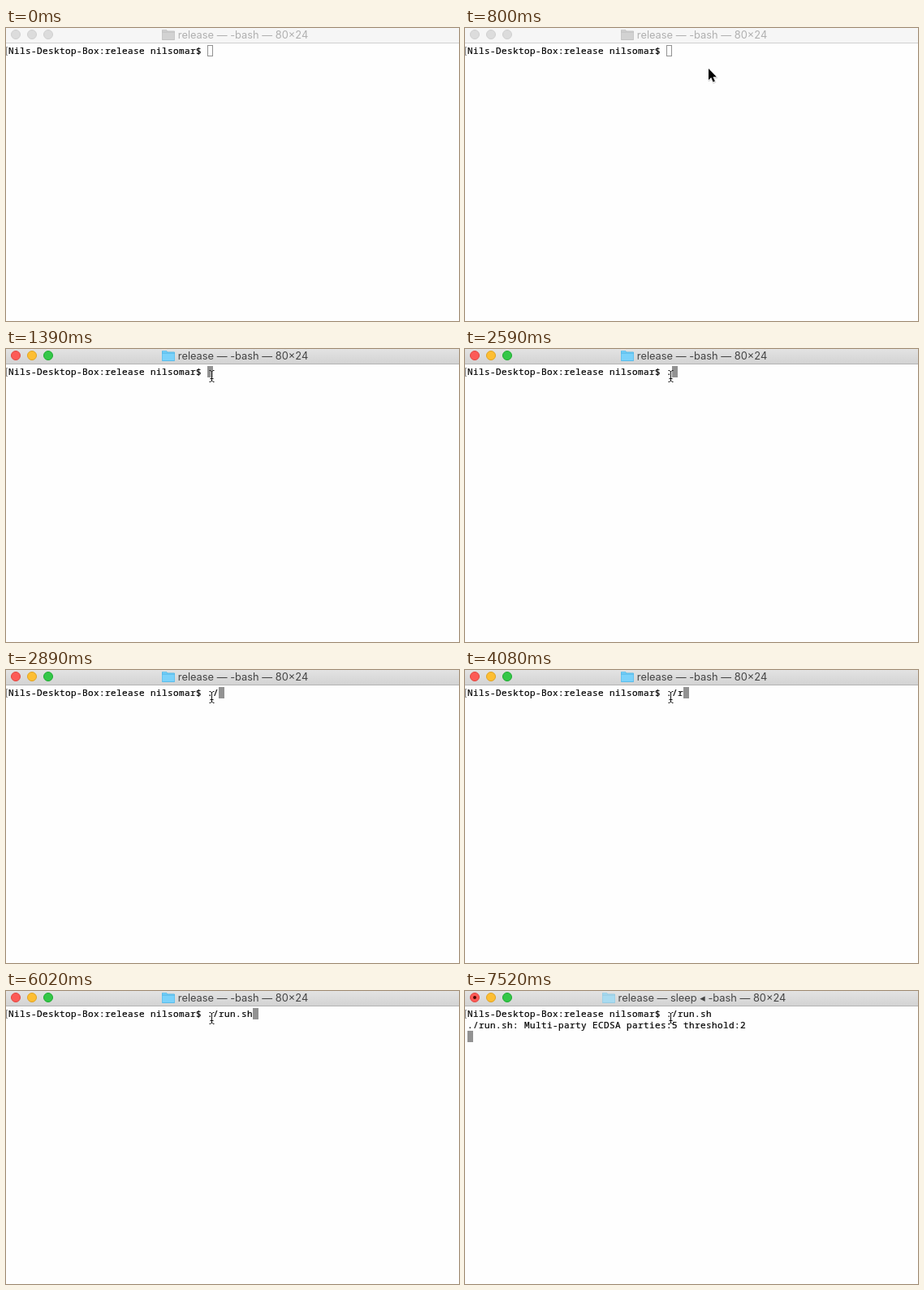
An HTML page for the animation above (8000 ms loop, 558 by 361 pixels).

```html
<!DOCTYPE html>
<html lang="en">
<head>
<meta charset="utf-8">
<title>Terminal</title>
<style>
html, body { margin: 0; width: 100%; height: 100%; overflow: hidden; background: #fefefe; }
svg, #text { position: absolute; left: 0; top: 0; }
#title { font: 12.85px Inter, "Liberation Sans", sans-serif; text-anchor: middle; fill: #444; }
#text {
  left: 3px; top: 21px; margin: 0; color: #000; white-space: pre;
  font: 500 11px/14px "Noto Sans Mono", "DejaVu Sans Mono", monospace;
  letter-spacing: calc(7px - 1ch);
  -webkit-text-stroke: .2px #000;
}
.light { stroke-width: 1; }
#caret { fill: #929292; }
#front { fill: #7bd2fa; }
#back { fill: #4fb5e4; }
.busy #front { fill: #a9dbf0; }
.busy #back { fill: #93c9e0; }
.idle #bar { fill: #f6f6f6; }
.idle #edge { fill: #d0d0d0; }
.idle .light { fill: #dcdcdc; stroke: #d0d0d0; }
.idle #title { fill: #b0b0b0; }
.idle #front { fill: #d2d2d2; }
.idle #back { fill: #bfbfbf; }
.idle #caret { fill: none; stroke: #929292; }
</style>
</head>
<body>
<div id="win" class="idle">
  <svg width="558" height="361">
    <defs>
      <linearGradient id="chrome" x2="0" y2="1">
        <stop offset="0" stop-color="#e3e3e3"/>
        <stop offset="1" stop-color="#d3d3d3"/>
      </linearGradient>
      <path id="pointer" d="M1 0v14l3.200-3 2.400 5.600 2.300-1-2.400-5.400h4.400z"/>
    </defs>
    <rect id="bar" width="558" height="18" fill="url(#chrome)"/>
    <rect id="edge" y="18" width="558" height="1" fill="#b4b4b4"/>
    <circle class="light" cx="12" cy="8" r="5.5" fill="#fc5b57" stroke="#e2463f"/>
    <circle class="light" cx="32" cy="8" r="5.5" fill="#fdbe33" stroke="#e0a322"/>
    <circle class="light" cx="52" cy="8" r="5.5" fill="#34c748" stroke="#1dab30"/>
    <circle id="dot" cx="12" cy="8" r="2" fill="#4d0503"/>
    <g id="folder">
      <path id="back" d="M0 3q0-1 1-1h4.500l1.500 1.500h8q1 0 1 1v9.500q0 1-1 1h-14q-1 0-1-1z"/>
      <path id="front" d="M.5 5.500h15v8q0 .7-.7.7h-13.600q-.7 0-.7-.7zM.7 3q0-.5.5-.5h4l1.500 1.500h8q.6 0 .6.600h-14.600z"/>
    </g>
    <text id="title" x="292" y="13"></text>
    <path d="M2 23.500H.5v10H2" fill="none" stroke="#888"/>
    <rect id="caret"/>
  </svg>
  <div id="text"></div>
  <svg width="558" height="361">
    <g id="arrow" stroke-linejoin="round">
      <use href="#pointer" x=".4" y="1" stroke="#000" stroke-width="2" opacity=".15"/>
      <use href="#pointer" stroke="#fff" stroke-width="1.600" paint-order="stroke"/>
    </g>
    <g id="beam" fill="none" stroke-linecap="square">
      <path d="M253.500 28v11" stroke="#fff" stroke-width="2.400" opacity=".7"/>
      <path d="M251 26.500h1l1.500 1.500 1.500-1.500h1M251 40.500h1l1.500-1.500 1.500 1.500h1M253.500 28v11M252 36.500h3" stroke="#111"/>
    </g>
  </svg>
</div>
<script>
const LOOP = 8000, FOCUS = 1390, RUN = 7520;
const prompt = "Nils-Desktop-Box:release nilsomar$ ";
const command = "./run.sh";
const output = "\n./run.sh: Multi-party ECDSA parties:5 threshold:2";
const keys = [2590, 2890, 4080, 4230, 4530, 5130, 5870, 6020];
// time, x, y of the pointer
const moves = [
  [500, 510, 77], [650, 388, 58], [800, 299, 50],
  [950, 264, 40], [1100, 252, 32], [1240, 251, 33]
];

const $ = id => document.getElementById(id);
const show = (id, on) => $(id).setAttribute("visibility", on ? "visible" : "hidden");
const place = (id, x, y) => $(id).setAttribute("transform", `translate(${x} ${y})`);
const setText = (id, s) => { if ($(id).textContent !== s) $(id).textContent = s; };

function setCaret(x, y, inset) {
  const box = { x: x + inset, y: y + inset, width: 7 - 2 * inset, height: 14 - 2 * inset };
  for (const k in box) $("caret").setAttribute(k, box[k]);
}

function draw(t) {
  const focused = t >= FOCUS, running = t >= RUN;
  const typed = keys.filter(k => k <= t).length;
  const pos = moves.filter(m => m[0] <= t).pop();

  $("win").className = running ? "busy" : focused ? "" : "idle";
  setText("title", running ? "release — sleep ◂ -bash — 80×24" : "release — -bash — 80×24");
  place("folder", running ? 169 : 192, 0);
  show("dot", running);

  setText("text", prompt + command.slice(0, typed) + (running ? output : ""));
  if (running) setCaret(3, 49, 0);
  else setCaret(3 + 7 * (prompt.length + typed), 21, focused ? 0 : 0.5);

  show("arrow", pos && !focused);
  if (pos) place("arrow", pos[1], pos[2]);
  show("beam", focused);
}

function tick() {
  draw(performance.now() % LOOP);
  requestAnimationFrame(tick);
}
tick();
</script>
</body>
</html>
```
